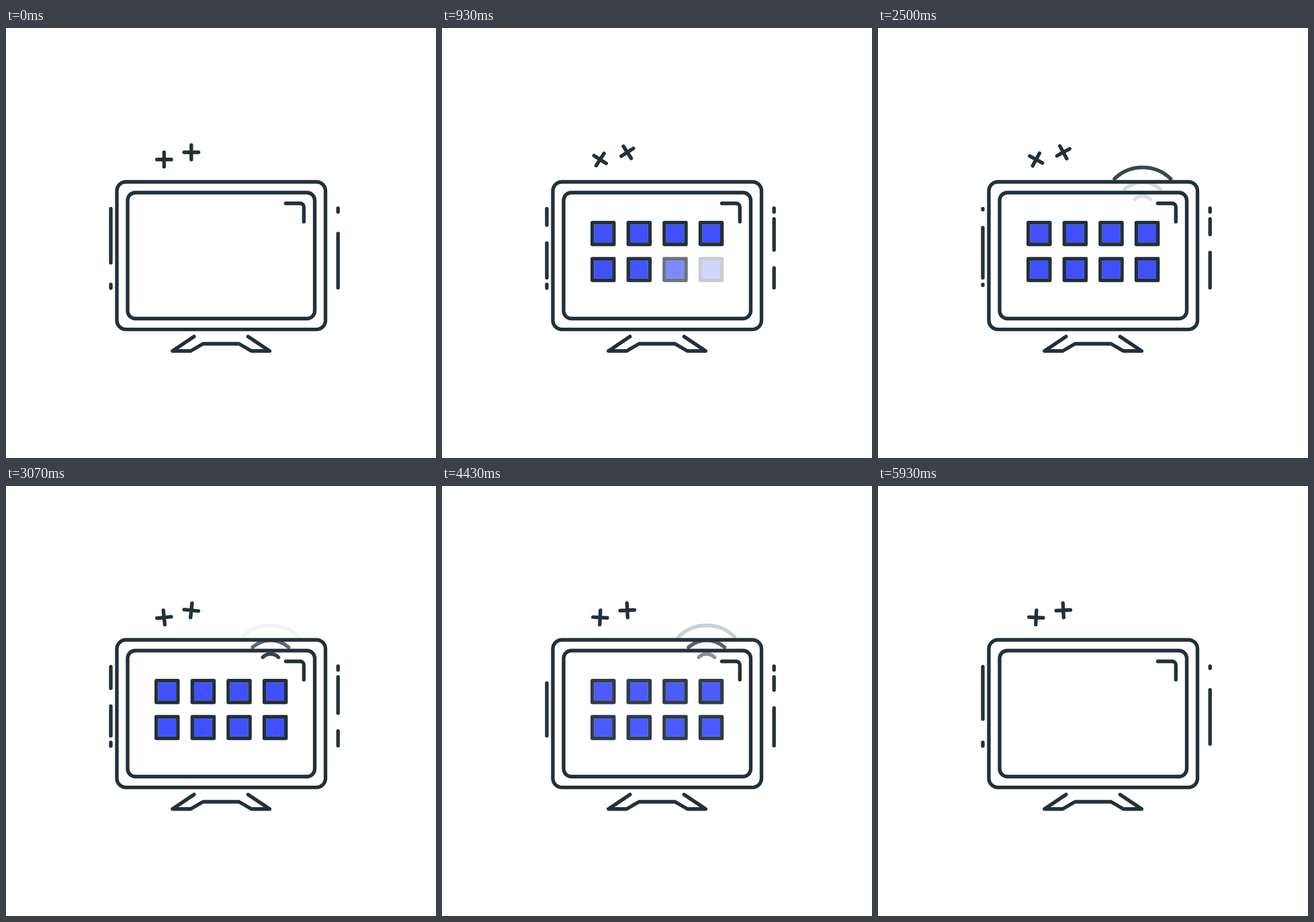
Write an HTML page with a canvas that moves like this. It is 640 px wide and 640 px high and loops after 6 s.

```html
<!DOCTYPE html>
<html lang="en">
<head>
<meta charset="utf-8">
<title>Screen</title>
<style>
  html, body { margin: 0; width: 100%; height: 100%; overflow: hidden; background: #fff; }
  canvas { display: block; width: 640px; height: 640px; }
</style>
</head>
<body>
<canvas id="stage" width="640" height="640"></canvas>
<script>
const ctx = document.getElementById('stage').getContext('2d');
const INK = '#22303a', BLUE = '#4050ff';
const LOOP = 6000, FPS = 14, LEAD = 25;
const U = 2.68; // icon grid unit in pixels

const clamp = x => Math.min(1, Math.max(0, x));
const ease = x => { x = clamp(x); return x * x * (3 - 2 * x); };

function line(...pts) {
  for (let i = 0; i < pts.length; i += 2) {
    if (i) ctx.lineTo(pts[i], pts[i + 1]);
    else ctx.moveTo(pts[i], pts[i + 1]);
  }
}

function stroke(build) {
  ctx.beginPath();
  build();
  ctx.stroke();
}

function drawScreen() {
  stroke(() => ctx.roundRect(165, 229, 310.5, 219.6, 13.4));
  stroke(() => ctx.roundRect(181, 245, 278.5, 187.5, 11.5));
  stroke(() => {
    ctx.moveTo(416.4, 261);
    ctx.arcTo(443.3, 261, 443.3, 288.2, 5.4);
    ctx.lineTo(443.3, 288.2);
  });
  stroke(() => line(279.8, 459.2, 247.8, 480.7, 274.8, 480.7, 293.2, 470,
                    346.8, 470, 365.3, 480.7, 392.4, 480.7, 360.3, 459.2));
}

function drawCross(x, y, angle) {
  const r = 4 * U;
  ctx.save();
  ctx.translate(x, y);
  ctx.rotate(angle);
  stroke(() => { line(-r, 0, r, 0); line(0, -r, 0, r); });
  ctx.restore();
}

// Dashes on both sides slide downwards
function drawDashes(t) {
  const shift = 40 * U * (t % 2000) / 2000;
  ctx.setLineDash([30 * U, 10 * U]);
  ctx.lineDashOffset = -shift;
  stroke(() => { line(156, 269, 156, 371.8); line(156, 381.6, 156, 387); });
  ctx.lineDashOffset = shift;
  stroke(() => { line(494.2, 386.4, 494.2, 284.2); line(494.2, 273.8, 494.2, 268.2); });
  ctx.setLineDash([]);
}

function drawTiles(t) {
  const out = 1 - ease((t - 4167) / 1833), size = 12 * U;
  for (let i = 0; i < 8; i++) {
    const x = 223.7 + (i % 4) * 20 * U, y = 289.8 + Math.floor(i / 4) * 20 * U;
    ctx.globalAlpha = ease((t - i * 118) / 400) * out;
    ctx.fillStyle = BLUE;
    ctx.fillRect(x + U, y + U, size - 2 * U, size - 2 * U);
    ctx.strokeRect(x, y, size, size);
  }
  ctx.globalAlpha = 1;
}

// Half chord, sagitta and top of each signal arc, inner first
const WAVES = [[11.7, 5, 250], [26.8, 10.4, 229.7], [41.9, 17, 207.5]];

function drawWaves(t) {
  const out = 1 - ease((t - 4167) / 1000), rise = 613;
  WAVES.forEach(([half, sag, top], i) => {
    const age = (t - 1150 - i * 318) / rise;
    if (age <= 0) return;
    ctx.globalAlpha = ease(1 - Math.abs(age % 2 - 1)) * out;
    const r = (half * half + sag * sag) / (2 * sag), a = Math.asin(half / r);
    stroke(() => ctx.arc(393.8, top + r, r, -Math.PI / 2 - a, -Math.PI / 2 + a));
  });
  ctx.globalAlpha = 1;
}

function draw(t) {
  ctx.fillStyle = '#fff';
  ctx.fillRect(0, 0, 640, 640);
  ctx.strokeStyle = INK;
  ctx.lineWidth = 2 * U;
  ctx.lineCap = ctx.lineJoin = 'round';
  drawWaves(t);
  drawScreen();
  const turn = t / LOOP * 2 * Math.PI;
  drawCross(235.3, 195.7, -turn);
  drawCross(275.8, 185, turn);
  drawDashes(t);
  if (t > 0) drawTiles(t);
}

const start = performance.now();

function tick() {
  const now = (performance.now() - start) % LOOP;
  const step = Math.floor(now * FPS / 1000 + 0.08) % (LOOP * FPS / 1000);
  draw(step ? step * 1000 / FPS + LEAD : 0);
  requestAnimationFrame(tick);
}
tick();
</script>
</body>
</html>
```
